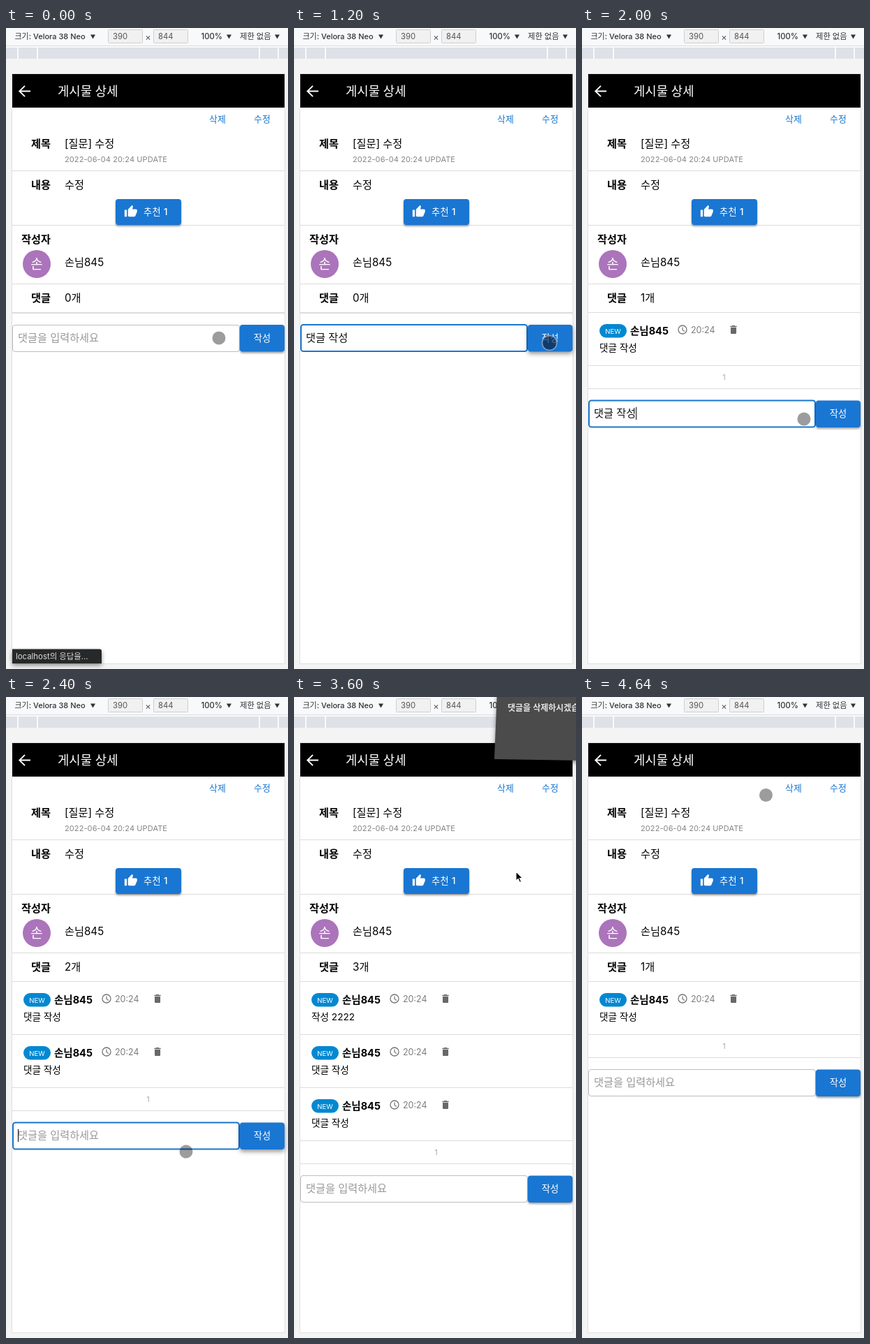
An HTML page that plays this animation: 404 px wide and 918 px high, repeating every 4.78 s.

```html
<!DOCTYPE html>
<html lang="ko">
<head>
<meta charset="utf-8">
<title>게시물 상세</title>
<style>
html, body { margin: 0; width: 100%; height: 100%; overflow: hidden; background: #f4f4f4; }
svg { display: block; width: 404px; height: 918px; font-family: Inter, "Noto Sans CJK KR", "Noto Sans CJK", sans-serif; }
text { white-space: pre; }
.low { filter: drop-shadow(0 2px 1.5px rgba(0,0,0,.38)); }
.high { filter: drop-shadow(0 3px 3px rgba(0,0,0,.42)); }
</style>
</head>
<body>
<svg viewBox="0 0 404 918">
  <g id="fixed"></g>
  <g id="live"></g>
</svg>
<script>
const LOOP = 4780, BLUE = '#1976d2', USER = '손님845';

const label = (x, cy, size, s, fill = '#000', weight = 400, extra = '') =>
  `<text x="${x}" y="${(cy + size * .37).toFixed(2)}" font-size="${size}" fill="${fill}" font-weight="${weight}" ${extra}>${s}</text>`;
const box = (x, y, w, h, fill, extra = '') =>
  `<rect x="${x}" y="${y}" width="${w}" height="${h}" fill="${fill}" ${extra}/>`;
const rule = y => box(9, y, 390, 1, '#dcdcdc');
const icon = (x, y, k, d, fill) => `<path transform="translate(${x} ${y}) scale(${k})" d="${d}" fill="${fill}"/>`;
const END = 'text-anchor="end"', MID = 'text-anchor="middle"';

const THUMB = 'M1 21h4V9H1zM23 10c0-1.1-.9-2-2-2h-6.3l1-4.6v-.3c0-.4-.2-.8-.5-1.1L14.200 1 7.600 7.600C7.200 8 7 8.500 7 9v10c0 1.100.9 2 2 2h9c.8 0 1.500-.5 1.800-1.200l3-7c.1-.3.2-.5.2-.8z';
const TRASH = 'M6 19c0 1.100.9 2 2 2h8c1.100 0 2-.9 2-2V7H6zM19 4h-3.500l-1-1h-5l-1 1H5v2h14z';
const ARROW = 'M0 0V13.500l3.100-2.900 2.200 5 2.400-1-2.200-4.900h4.300z';

function fixedPart() {
  const drop = x => `<path d="M${x} 9.500h7l-3.500 6z" fill="#333"/>`;
  const field = (x, s) => box(x + .5, 2.5, 49, 19, '#f1f1f1', 'stroke="#cdcfd2" rx="1"') + label(x + 7, 12, 11.3, s, '#555');
  const head = (cy, s) => label(64, cy, 15.2, s, '#000', 700, END);
  return box(0, 0, 404, 26, '#f8f9fa') + box(0, 25, 404, 1, '#dadce0') + box(0, 26, 404, 2, '#fafafa') +
    box(0, 28, 404, 16, '#dee1e7') +
    [16, 44, 362, 389].map(x => box(x, 28, 2, 16, '#fafafa')).join('') +
    label(12.5, 12, 11, '크기: Velora 38 Neo', '#303236', 500) + drop(121) +
    field(146, '390') + field(211, '844') + label(203.5, 13.5, 13, '×', '#555', 400, MID) +
    label(279.5, 12, 11.3, '100%', '#303236', 500) + drop(316) +
    label(335, 12, 11.3, '제한 없음', '#303236', 500) + drop(385) +
    box(8.5, 65.5, 391, 845, '#fff', 'stroke="#e0e0e0"') +
    box(9, 66, 390, 48, '#000') +
    '<path d="M35 90.500H19.500M27 82.800l-7.700 7.700 7.700 7.700" fill="none" stroke="#fff" stroke-width="1.900"/>' +
    label(74, 90, 17.8, '게시물 상세', '#fff', 500) +
    label(291, 130, 13, '삭제', BLUE, 500) + label(355, 130, 13, '수정', BLUE, 500) +
    head(165, '제목') + label(84, 165, 15.2, '[질문] 수정') +
    label(84, 187.5, 11, '2022-06-04 20:24 UPDATE', '#858585', 400, 'letter-spacing=".1"') + rule(204) +
    head(224, '내용') + label(84, 224, 15.2, '수정') + rule(282) +
    box(157, 245, 94, 37, BLUE, 'rx="4" class="low"') + icon(169, 253, .82, THUMB, '#fff') +
    label(197, 263, 13.2, '추천 1', '#fff', 500, 'letter-spacing=".4"') +
    head(302, '작성자') + `<circle cx="44" cy="338" r="20" fill="#ab74bb"/>` +
    label(44, 337.5, 19, USER[0], '#fff', 400, MID) + label(84, 335, 15.2, USER) + rule(366) +
    head(386, '댓글') + rule(407);
}

function comment(s, i) {
  const y = 408 + 76 * i;
  return box(25, y + 16, 39, 19.5, '#0288d1', 'rx="9.750"') + label(44.5, y + 26.3, 9.6, 'NEW', '#fff', 400, MID) +
    label(69, y + 25.5, 14.5, USER, '#000', 700) +
    `<path d="M144 ${y + 20.5}v4l3 2" fill="none" stroke="#757575" stroke-width="1.200"/>` +
    `<circle cx="144" cy="${y + 24}" r="6" fill="none" stroke="#757575" stroke-width="1.300"/>` +
    label(156, y + 24, 12.5, '20:24', '#7c7c7c') + icon(209, y + 16, .67, TRASH, '#686868') +
    label(25, y + 50, 13.6, s) + rule(y + 75);
}

// Latest entry at or before t
const at = (rows, t) => rows.filter(r => r[0] <= t).pop().slice(1);

const A = '댓글 작성', B = '작성 2222';
const LISTS = [[0], [1300, A], [2200, A, A], [3100, B, A, A], [3800, B, A], [4400, A]];
const TYPED = [[0, ''], [700, '대'], [800, '댓그'], [900, '댓글'], [1000, '댓글 자'], [1100, A],
  [1300, ''], [1500, '대'], [1600, '댓그'], [1700, '댓글'], [1800, '댓글 자'], [1900, '댓글 작서'], [2000, A],
  [2200, ''], [2500, '자'], [2600, '작서'], [2700, '작성 2'], [2800, '작성 22'], [2900, B], [3100, '']];
const COMPOSING = [700, 800, 900, 1000, 1500, 1600, 1700, 1800, 1900, 2500, 2600];
const PRESSED = [300, 1200, 2100, 3000, 3400];

// Pointer runs: kind, then time and place
const RUNS = [
  ['dot', [0, 305, 444], [300, 272, 446], [600, 272, 446]],
  ['dot', [1000, 300, 448], [1200, 366, 451], [1300, 366, 451]],
  ['dot', [2000, 318, 560], [2100, 366, 555], [2200, 340, 590], [2400, 258, 651]],
  ['dot', [2900, 322, 642], [3000, 366, 632], [3100, 311, 594], [3400, 217, 508]],
  ['arrow', [3500, 213, 513], [3600, 318, 250]],
  ['dot', [3700, 350, 260], [3900, 217, 432]],
  ['arrow', [4000, 213, 437], [4100, 260, 330], [4200, 340, 180]],
  ['dot', [4400, 370, 330], [4500, 328, 293], [4640, 263.5, 140.5]]
];
// Opacity of the confirm box, which grows as it fades in
const CONFIRM = [[0, 0], [3500, .8], [3600, 1], [3700, .5], [3800, 0], [4000, .8], [4100, 1], [4300, .5], [4400, 0]];

function pointer(t) {
  const run = RUNS.find(r => t >= r[1][0] && t <= r[r.length - 1][0]);
  if (!run) return '';
  const pts = run.slice(1);
  const k = Math.max(1, pts.findIndex(p => p[0] >= t));
  const [a, b] = [pts[k - 1], pts[k]], u = (t - a[0]) / (b[0] - a[0]);
  const [x, y] = [1, 2].map(i => a[i] + (b[i] - a[i]) * u);
  if (run[0] === 'arrow')
    return `<path transform="translate(${x} ${y})" d="${ARROW}" fill="#000" stroke="#fff" stroke-width="1.200"/>`;
  return PRESSED.includes(t)
    ? `<circle cx="${x}" cy="${y}" r="10.500" fill="rgba(10,25,50,.62)" stroke="#7da3cc" stroke-width="1.500"/>`
    : `<circle cx="${x}" cy="${y}" r="9.500" fill="rgba(0,0,0,.39)"/>`;
}

function confirmBox(t) {
  const [o] = at(CONFIRM, t);
  if (!o) return '';
  const d = (o - .8) * 30;
  return `<g opacity="${o}"><path class="high" d="M${297 - d} -9H420V${85 + d}L${293 - d} ${83 + d}z" fill="#4b4b4b"/>` +
    label(312 - d, 10 + d, 12, '댓글을 삭제하시겠습니까?', '#e4e4e4', 600) + '</g>';
}

function form(t, n) {
  const y = n ? 457.5 + 76 * n : 425, [s] = at(TYPED, t);
  const focus = t >= 300 && t < 3100, hover = t === 3100 || t === 1200 || t === 3000;
  const frame = focus
    ? box(10, y, 324, 38, '#fff', `rx="3.500" stroke="${BLUE}" stroke-width="2"`)
    : box(9.5, Math.floor(y) + .5, 325, 38, '#fff', 'rx="3.500" stroke="#bdbdbd"');
  let caret = '';
  if (focus && t !== 1200) {
    const spaces = s.split(' ').length - 1, digits = s.replace(/\D/g, '').length;
    const x = 17 + 15.2 * ((s.length - spaces - digits) * .92 + spaces * .28 + digits * .62);
    if (COMPOSING.includes(t)) caret += box(x - 14, y + 26, 14, 1, '#222');
    caret += box(x, y + 9.5, 1, 18, '#000');
  }
  return frame + label(17, y + 18, 15.2, s || '댓글을 입력하세요', s ? '#111' : '#999') + caret +
    box(335, y, 64, 38.5, t === 3100 ? '#2b7cd3' : BLUE, `rx="4" class="${hover || t === 2400 ? 'high' : 'low'}"`) +
    label(367, y + 19, 13.3, '작성', '#fff', 500, MID);
}

function livePart(t) {
  const list = at(LISTS, t), n = list.length, end = 408 + 76 * n;
  return label(84, 386, 15.2, n + '개') + list.map(comment).join('') +
    (n ? label(203.5, end + 16, 11, '1', '#aaa', 400, MID) + rule(end + 32) : rule(408)) +
    form(t, n) +
    (t < 100 ? '<path class="high" d="M9 889.500H134q3 0 3 3V910H9z" fill="#272829"/>' +
      label(14, 900, 11.4, 'localhost의 응답을…', '#dcdcdc') : '') +
    confirmBox(t) + pointer(t);
}

const live = document.getElementById('live');
document.getElementById('fixed').innerHTML = fixedPart();
const start = performance.now();
let shown = -1;
function tick() {
  const ms = (performance.now() - start) % LOOP;
  const t = ms >= 4640 ? 4640 : Math.min(4500, Math.floor(ms / 100) * 100);
  if (t !== shown) live.innerHTML = livePart(shown = t);
  requestAnimationFrame(tick);
}
tick();
</script>
</body>
</html>
```
